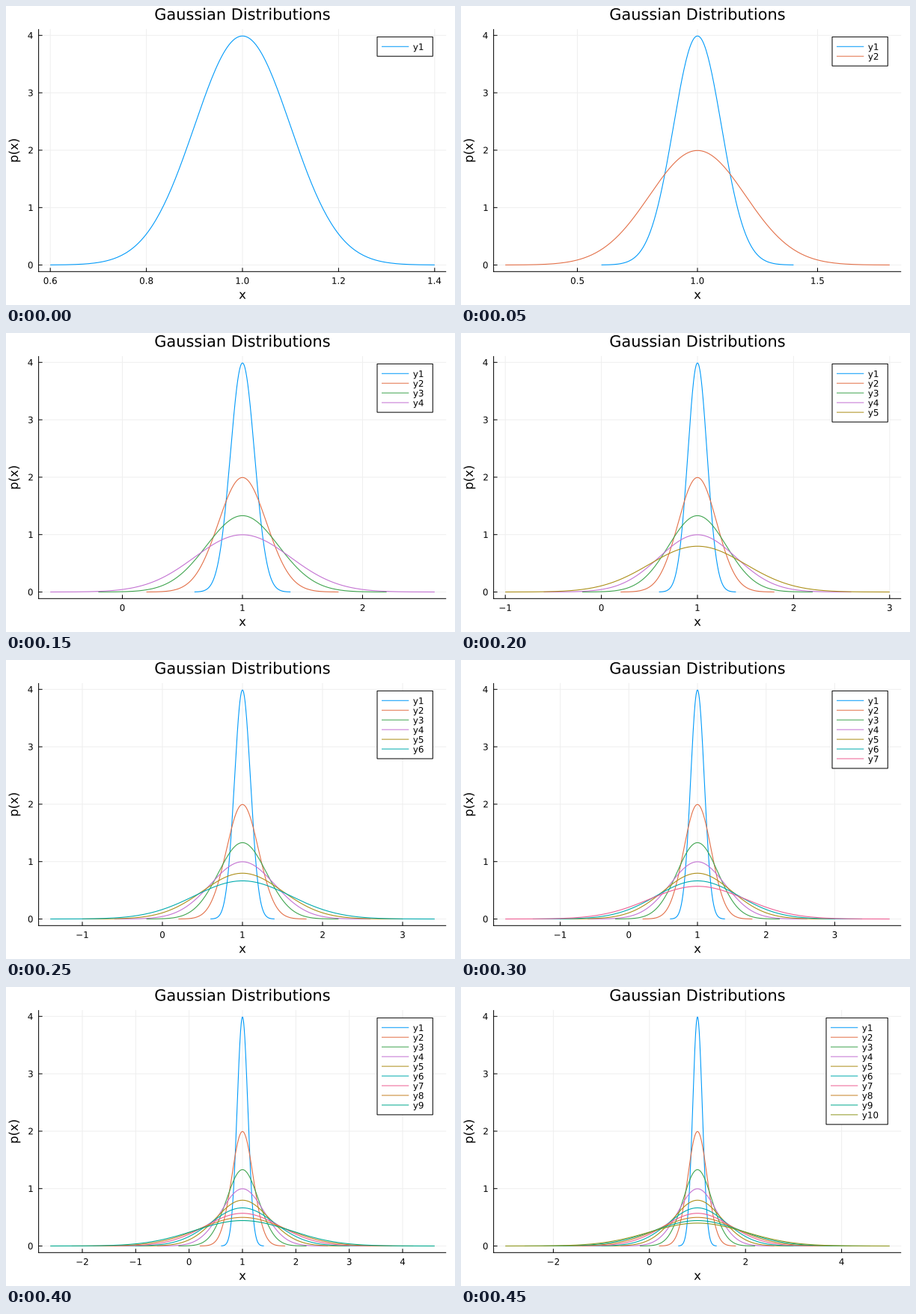
Recreate the animation shown at these times as a matplotlib script. Size 600x400 px, loop 0.5 s.

```python
import numpy as np
import matplotlib.pyplot as plt
from matplotlib.animation import FuncAnimation
from matplotlib.patches import PathPatch, Rectangle
from matplotlib.textpath import TextPath
from matplotlib.transforms import Affine2D

W, H, DPI = 600, 400, 100
COUNT = 10
MEAN = 1.0
REACH = 4                         # each curve spans this many deviations
LEFT, RIGHT, TOP, BOTTOM = 43.6, 588.2, 30.9, 355.3
CENTER = 316
HALF = 256.8
Y_ZERO, Y_UNIT = 346.5, 76.8
COLORS = ["#009afa", "#e36f47", "#3ea44e", "#c371d2", "#ac8e18",
          "#00aaae", "#ed5e93", "#c68225", "#00a98d", "#8e971e"]

plt.rcParams["font.family"] = "DejaVu Sans"

fig = plt.figure(figsize=(W / DPI, H / DPI), dpi=DPI, facecolor="white")
ax = fig.add_axes([0, 0, 1, 1])


def pt(px):
    return px * 72 / DPI


def line(xs, ys, color="black", width=1.0, z=2):
    ax.plot(xs, ys, color=color, lw=pt(width), zorder=z, snap=False,
            solid_capstyle="butt")


def label(x, y, text, size, align=0.5, angle=0):
    """Text as outlines; align is 0 for left, 0.5 for centre, 1 for right."""
    path = TextPath((0, 0), text, size=size)
    box = path.get_extents()
    place = (Affine2D().translate(-box.x0 - align * box.width, 0)
             .scale(1, -1).rotate_deg(-angle).translate(x, y))
    ax.add_patch(PathPatch(place.transform_path(path), fc="black", lw=0,
                           zorder=7, snap=False))


def tick_step(n):
    if n == 1:
        return 0.2
    if n <= 3:
        return 0.5
    return 1 if n < COUNT else 2


def draw_axes(n):
    reach = REACH * 0.1 * n
    step = tick_step(n)
    first = int(np.ceil((MEAN - reach) / step - 1e-6))
    last = int(np.floor((MEAN + reach) / step + 1e-6))
    for k in range(first, last + 1):
        value = k * step
        x = CENTER + (value - MEAN) / reach * HALF
        line([x, x], [TOP, BOTTOM], "#efefef", z=1)
        line([x, x], [BOTTOM, BOTTOM - 5])
        text = f"{value:.1f}" if step < 1 else str(value)
        label(x, 371.8, text.replace("-", "\u2212"), 11.9)

    for value in range(5):
        y = Y_ZERO - value * Y_UNIT
        line([LEFT, RIGHT], [y, y], "#efefef", z=1)
        line([LEFT, LEFT + 5], [y, y])
        label(35.7, y + 4.4, str(value), 11.9, align=1)

    line([LEFT, LEFT], [TOP, BOTTOM + 0.5])
    line([LEFT - 0.5, RIGHT], [BOTTOM, BOTTOM])
    label(CENTER, 18.4, "Gaussian Distributions", 20.9)
    label(CENTER, 391.7, "x", 16.4)
    label(15.9, 193.2, "p(x)", 16.4, angle=90)


def draw_curves(n):
    z = np.linspace(-REACH, REACH, 201)
    bell = np.exp(-z * z / 2) / np.sqrt(2 * np.pi)
    for i in range(1, n + 1):
        line(CENTER + z / REACH * HALF * i / n,
             Y_ZERO - bell / (0.1 * i) * Y_UNIT, COLORS[i - 1], 1.1, 3)


def draw_legend(n):
    row = 12.96
    left, right, top = (488 if n == COUNT else 496), 570.3, 41.3
    ax.add_patch(Rectangle((left, top), right - left, row * (n + 1),
                           fc="white", ec="black", lw=pt(1), zorder=5,
                           snap=False))
    for i in range(n):
        y = top + row * (i + 1)
        line([left + 6, left + 42.3], [y, y], COLORS[i], 1.0, 6)
        label(left + 48.2, y + 4.6, f"y{i + 1}", 11.9, align=0)


def draw(frame):
    ax.clear()
    ax.set_xlim(0, W)
    ax.set_ylim(H, 0)
    ax.axis("off")
    n = frame + 1
    draw_axes(n)
    draw_curves(n)
    draw_legend(n)
    return []


anim = FuncAnimation(fig, draw, frames=COUNT, interval=50,
                     repeat=True, repeat_delay=0, blit=False)
plt.show()
```
